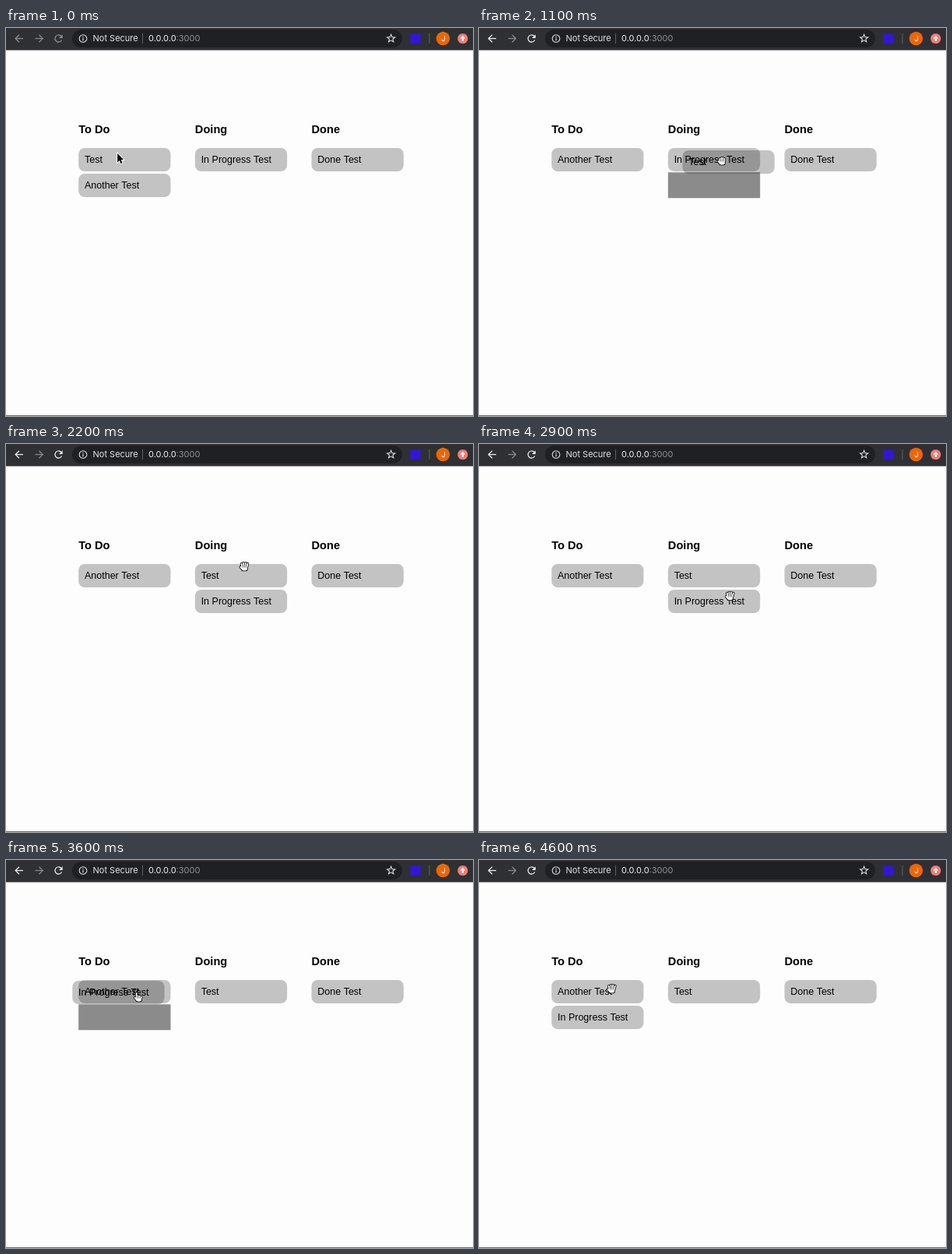
These frames come from a looping animation (600x498 px, 5000 ms). An HTML page with a canvas:

```html
<!DOCTYPE html>
<html lang="en">
<head>
<meta charset="utf-8">
<title>Task board</title>
<style>
  html, body { margin: 0; width: 100%; height: 100%; overflow: hidden; background: #fefdfe; }
  canvas { display: block; width: 600px; height: 498px; }
</style>
</head>
<body>
<canvas id="stage"></canvas>
<script>
const W = 600, H = 498, LOOP = 5000, STEP = 100;
const CARD_W = 118.3, CARD_H = 30, ROW = 33, TOP = 154;
const COLS = [0, 1, 2].map(i => 93.2 + i * 149.65);
const UI = 'Inter, Roboto, sans-serif';
const PAGE = '"Liberation Sans", Arial, sans-serif';

const canvas = document.getElementById('stage');
const ctx = canvas.getContext('2d');
const dpr = window.devicePixelRatio || 1;
canvas.width = W * dpr;
canvas.height = H * dpr;
ctx.scale(dpr, dpr);

// Smooth progress from 0 at time a to 1 at time b
function ease(t, a, b) {
  const p = Math.min(1, Math.max(0, (t - a) / (b - a)));
  return p * p * (3 - 2 * p);
}
const mix = (a, b, p) => a + (b - a) * p;

// A drag carries a card along `path`, then drops it into `home`.
// `lead` is how far the cursor runs ahead of the card, in ms.
const testDrag = {
  start: 400, drop: 1900, end: 2200, shift: 1300, lead: 35, grab: [50, 13],
  home: [COLS[1], TOP],
  path: t => [
    mix(COLS[0], 262, ease(t, 400, 1125)) - 6 * ease(t, 1380, 1800),
    TOP + 3 * ease(t, 400, 1000) - 13 * ease(t, 1140, 1530)
  ]
};
const progressDrag = {
  start: 3200, drop: 4300, end: 4600, shift: 3640, lead: 5, grab: [85, 21],
  home: [COLS[0], TOP],
  path: t => [
    mix(COLS[1], 85.3, ease(t, 3110, 3500)),
    TOP + ROW - 32 * ease(t, 3110, 3420) - 11 * ease(t, 3680, 3900)
  ]
};

function cardAt(drag, t) {
  const p = ease(t, drag.drop, drag.end);
  return drag.path(t).map((v, i) => mix(v, drag.home[i], p));
}

function heldAt(drag, t) {
  return drag.path(t + drag.lead).map((v, i) => v + drag.grab[i]);
}

// Neighbours slide by one row to make or close a gap
const slide = (t, start) => ROW * ease(t, start, start + 275);

function text(str, x, y, font, color) {
  ctx.font = font;
  ctx.fillStyle = color;
  ctx.fillText(str, x, y);
}

function box(x, y, w, h, color, r = 0) {
  ctx.fillStyle = color;
  ctx.beginPath();
  ctx.roundRect(x, y, w, h, r);
  ctx.fill();
}

function disc(x, y, r, color) {
  ctx.fillStyle = color;
  ctx.beginPath();
  ctx.arc(x, y, r, 0, Math.PI * 2);
  ctx.fill();
}

function trace(points, closed) {
  ctx.beginPath();
  points.forEach(([x, y]) => ctx.lineTo(x, y));
  if (closed) ctx.closePath();
}

function outline(color, width) {
  ctx.strokeStyle = color;
  ctx.lineWidth = width;
  ctx.stroke();
}

function arrowIcon(x, dir, color) {
  trace([[x - 5 * dir, 13.5], [x + 5 * dir, 13.5]]);
  outline(color, 1.3);
  trace([[x, 8.7], [x + 4.8 * dir, 13.5], [x, 18.3]]);
  outline(color, 1.3);
}

function reloadIcon(x, y, color) {
  ctx.beginPath();
  ctx.arc(x, y, 4.5, 0.45, Math.PI * 1.78);
  outline(color, 1.3);
  ctx.fillStyle = color;
  trace([[x + 5.2, y - 5.3], [x + 5.2, y - 0.6], [x + 0.5, y - 0.6]], true);
  ctx.fill();
}

function starIcon(x, y) {
  trace(Array.from({ length: 10 }, (_, i) => {
    const r = i % 2 ? 2.3 : 5.3, a = i * Math.PI / 5 - Math.PI / 2;
    return [x + r * Math.cos(a), y + r * Math.sin(a)];
  }), true);
  outline('#d3d5d8', 1.1);
}

function infoIcon(x, y, color) {
  ctx.beginPath();
  ctx.arc(x, y, 4.8, 0, Math.PI * 2);
  outline(color, 1.1);
  box(x - 0.6, y - 0.7, 1.2, 3.4, color);
  box(x - 0.6, y - 2.8, 1.2, 1.2, color);
}

function updateIcon(x, y) {
  disc(x, y, 6.6, '#ee7d76');
  ctx.fillStyle = '#fff';
  trace([[x, y - 3.7], [x + 3.4, y], [x - 3.4, y]], true);
  ctx.fill();
  box(x - 1.2, y, 2.4, 3, '#fff');
}

function toolbar(active) {
  const icon = active ? '#e6e8eb' : '#8b8d91', font = '11px ' + UI;
  box(0, 0, W, 28.5, '#2f3034');
  box(85, 2, 424, 23, '#1f2023', 11.5);
  arrowIcon(17, -1, icon);
  arrowIcon(42.5, 1, '#85878b');
  reloadIcon(67.5, 13.5, icon);
  infoIcon(99, 13.5, '#dfe1e4');

  text('Not Secure', 111.5, 17.3, font, '#dfe1e4');
  for (const x of [175, 543.5]) box(x, 7, 1, 13, '#5f6165');
  text('0.0.0.0', 183, 17.3, font, '#f1f2f4');
  text(':3000', 183 + ctx.measureText('0.0.0.0').width, 17.3, font, '#8f9195');

  starIcon(494.7, 13.5);
  box(519.5, 8, 13, 11.5, '#3216dc');
  disc(561.5, 13.5, 8.7, '#ec6608');
  text('J', 559.2, 17, '9.5px ' + UI, '#fff');
  updateIcon(586.8, 13.5);
}

function card(label, x, y) {
  box(x, y, CARD_W, CARD_H, 'rgba(0,0,0,.23)', 8);
  text(label, x + 7.8, y + 19, '12.5px ' + PAGE, '#000');
}

// The drop slot shows in the column under the dragged card's middle
function slot(drag, t) {
  if (!drag || t >= drag.end) return;
  const middle = cardAt(drag, t)[0] + CARD_W / 2;
  const col = COLS.find(x => middle >= x && middle <= x + CARD_W);
  if (col === undefined) return;
  const atSource = drag === testDrag && col === COLS[0];
  const row = atSource ? 0 : 1 - ease(t, drag.shift, drag.shift + 182);
  box(col, TOP - 1.7 + ROW * row, CARD_W, ROW, 'rgba(0,0,0,.45)');
}

function pointer(x, y) {
  trace([[0, -6], [0, 5.4], [2.6, 3], [4.3, 6.9], [6.2, 6.1], [4.5, 2.3], [7.8, 2.1]]
    .map(([px, py]) => [x + px, y + py]), true);
  outline('#fff', 1.8);
  ctx.fillStyle = '#000';
  ctx.fill();
}

const OPEN = { reach: 3.4, spread: 1.35, index: 0 };
const FIST = { reach: 2, spread: 1, index: 0 };
const POINT = { reach: 0.4, spread: 1, index: 4.6 };

// Four fingers and a thumb over a palm: black first, then white inside
function hand({ reach, spread, index }, x, y) {
  ctx.save();
  ctx.translate(x, y);
  ctx.lineCap = 'round';
  for (const [color, width, grow] of [['#000', 3.4, 0.8], ['#fff', 1.8, 0]]) {
    for (let i = 0; i < 4; i++) {
      const fx = -2.6 + 2 * i, middle = i === 1 || i === 2;
      trace([[fx, 1], [fx * spread, -reach - (middle ? 1 : 0) - (i ? 0 : index)]]);
      outline(color, width);
    }
    trace([[-2, 4], [-4.7, 0.9]]);
    outline(color, width);
    box(-3 - grow, -0.5 - grow, 6.8 + 2 * grow, 6 + 2 * grow, color, 2.2);
  }
  for (let i = 0; i < 3; i++) {
    trace([[-1.6 + 2 * i, -1.2], [-1.6 + 2 * i, 1.5]]);
    outline('#000', 0.5);
  }
  ctx.restore();
}

function cursor(t) {
  const first = heldAt(testDrag, t), second = heldAt(progressDrag, t);
  const p = ease(t, 2500, 3100);
  const [x, y] = first.map((v, i) => mix(v, second[i], p));
  if (t < testDrag.start) pointer(x, y);
  else if (t < 2000) hand(FIST, x, y);
  else if (t >= progressDrag.start && t < 4400) hand(POINT, x, y);
  else hand(OPEN, x, y);
}

function draw(t) {
  box(0, 0, W, H, '#fefdfe');
  toolbar(t >= 100);
  box(0, 497, W, 1, '#6f6f70');
  ['To Do', 'Doing', 'Done'].forEach((name, i) =>
    text(name, COLS[i], 135, 'bold 14.63px ' + PAGE, '#000'));

  const second = t >= progressDrag.start;
  const dropped = t >= progressDrag.end ? ROW : 0; // the two cards swap on landing
  const [px, py] = cardAt(progressDrag, t);
  const test = () => card('Test', ...cardAt(testDrag, t));
  const progress = () => card('In Progress Test', px,
    second ? py + dropped : TOP + slide(t, testDrag.shift));

  card('Done Test', COLS[2], TOP);
  card('Another Test', COLS[0],
    TOP + ROW - slide(t, 700) + slide(t, progressDrag.shift) - dropped);

  // The dragged card is always on top
  const layers = second ? [test, progress] : [progress, test];
  layers[0]();
  slot(second ? progressDrag : t >= testDrag.start && testDrag, t);
  layers[1]();
  cursor(t);
}

const start = performance.now();
function tick() {
  const t = Math.max(0, performance.now() - start) % LOOP;
  draw(Math.floor(t / STEP) * STEP);
  requestAnimationFrame(tick);
}
tick();
</script>
</body>
</html>
```
